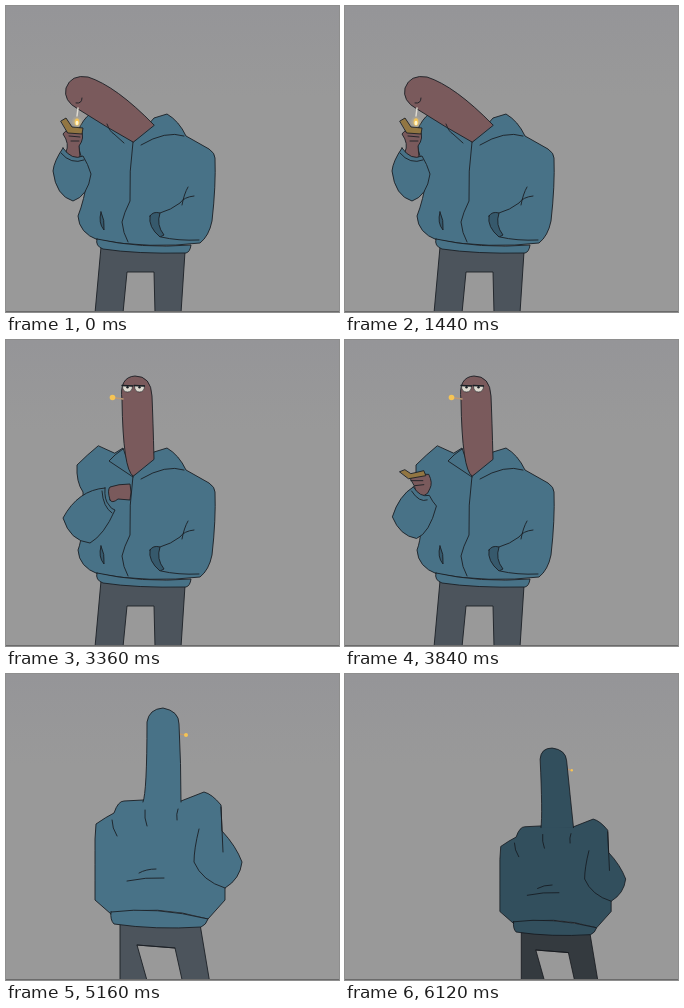
An HTML page with a canvas for the animation above (6.24 s loop, 333 by 306 pixels).

```html
<!DOCTYPE html>
<html>
<head>
<meta charset="utf-8">
<style>
html, body { margin: 0; height: 100%; overflow: hidden; background: #999; }
canvas { display: block; }
</style>
</head>
<body>
<canvas id="stage" width="333" height="306"></canvas>
<script>
const ctx = document.getElementById('stage').getContext('2d');
const LOOP = 6240, STEP = 120;
const INK = [27, 32, 37], BLUE = [72, 114, 135], SKIN = [122, 90, 92], PANTS = [76, 84, 92],
  DARK = [54, 89, 108], GOLD = [146, 118, 66], TAN = [188, 152, 116], WHITE = [222, 218, 208],
  GLOW = [246, 196, 84], GREY = [153, 153, 153];
let light = 1;

const ramp = (t, a, b) => {
  const p = Math.min(1, Math.max(0, (t - a) / (b - a)));
  return p * p * (3 - 2 * p);
};
const lerp = (a, b, k) => a + (b - a) * k;
const css = c => `rgb(${c.map(v => Math.round(v * light))})`;

// Blend two path strings that share the same commands.
function mix(a, b, k) {
  const target = b.match(/-?[\d.]+/g);
  let i = 0;
  return a.replace(/-?[\d.]+/g, n => lerp(+n, +target[i++], k).toFixed(2));
}
function shape(d, fill, width = .9) {
  const path = new Path2D(d);
  if (fill) { ctx.fillStyle = css(fill); ctx.fill(path); }
  if (width) { ctx.strokeStyle = css(INK); ctx.lineWidth = width; ctx.stroke(path); }
}
function dot(x, y, rx, ry, fill) {
  ctx.fillStyle = css(fill);
  ctx.beginPath();
  ctx.ellipse(x, y, rx, ry, 0, 0, 7);
  ctx.fill();
}
function cigarette(x1, y1, x2, y2, paper, glow) {
  ctx.strokeStyle = css(paper);
  ctx.lineWidth = 1.5;
  ctx.beginPath();
  ctx.moveTo(x1, y1);
  ctx.lineTo(x2, y2);
  ctx.stroke();
  if (glow) dot(x2, y2, glow, glow, GLOW);
}
function flame(x, y, t) {
  const h = 3.6 + Math.sin(t * 7.3);
  const halo = ctx.createRadialGradient(x, y, 0, x, y, 6);
  halo.addColorStop(0, '#ffd97a88');
  halo.addColorStop(1, '#ffd97a00');
  ctx.fillStyle = halo;
  ctx.fillRect(x - 6, y - 6, 12, 12);
  dot(x, y, 2.3, h, GLOW);
  dot(x, y + 1, 1.5, h * .6, [255, 245, 205]);
}

const HEAD = {
  down: 'M127 136 Q100 121 72 103 Q57 95 60 82 Q65 68 82 71 Q110 80 148 119 Z',
  up: 'M127 136 Q117 130 116 60 Q113 37 129 36 Q145 36 146 56 Q147 80 148 119 Z'
};
const SLEEVE = {
  face: 'M57 142 Q48 155 47 165 Q50 190 67 195 Q82 190 85 168 Q82 158 77 150 Q66 155 57 142 Z',
  away: 'M45 146 Q40 160 40 176 Q48 192 62 195 Q74 192 78 163 Q74 156 70 148 Q57 156 45 146 Z',
  inside: 'M99 148 Q72 150 57 178 Q64 201 84 203 Q98 195 109 170 Q105 169 103 165 Q98 160 99 148 Z'
};
const HAND = {
  face: 'M60 146 Q64 138 57 128 Q60 122 75 124 Q79 132 73 140 L74 152 Q66 154 60 146 Z',
  away: 'M47 150 Q47 142 36 133 Q36 125 53 127 Q59 136 55 140 L60 149 Q53 154 47 150 Z',
  inside: 'M104 160 Q101 150 104 147 Q112 144 124 144 Q126 152 124 160 L112 159 Q106 164 104 160 Z'
};
const LIGHTER = [
  'M55 115 L60 112 L66 121 L77 122 L76 128 L62 127 Z',
  'M31 123 L36 121 L42 125 L55 122 L57 127 L40 130 Z'
];

function drawFront(t) {
  const up = ramp(t, 2460, 2820), away = ramp(t, 2040, 2400);
  const inside = ramp(t, 2640, 3120) - .6 * ramp(t, 3480, 3900);
  const arm = pose => mix(mix(pose.face, pose.away, away), pose.inside, inside);

  shape('M95 241 L89 307 L117 307 L121 266 L148 266 L149 307 L175 307 L179 246 Z', PANTS);
  const right = 'Q78 195 72 210 Q73 227 92 234 Q145 243 194 237 Q203 230 206 215 Q210 180 209 152 Q209 147 203 143 L180 130 Q173 115 161 108 L148 112 L127 136 ';
  shape(mix(
    'M84 108 Q77 113 72 125 Q70 142 82 170 ' + right + 'L102 114 L95 111 Z',
    'M92 106 Q81 115 71 125 Q70 142 77 152 ' + right + 'L117 108 L109 113 Z', up), BLUE);
  shape('M91 233 Q135 243 185 239 Q184 246 180 247 Q130 248 97 243 Q89 240 91 233 Z', BLUE);
  shape('M127 136 Q123 165 124 195 Q118 207 116 216 Q117 227 122 236 M178 130 Q160 124 135 139');
  shape('M188 190 Q178 191 174 197 Q165 204 154 207 M182 181 Q178 188 176 199 M155 231 Q172 235 193 234');
  shape('M144 210 Q142 221 154 231 L158 229 Q150 219 154 207 Q147 205 144 210 Z', DARK);
  shape('M95 206 Q92 217 98 224 Q99 214 95 206 Z', DARK);

  shape(mix(HEAD.down, HEAD.up, up), SKIN);
  shape(mix('M101 118 Q104 126 108 128 L118 137', 'M117 109 Q108 115 103 121 L127 137', up));
  if (up < .5) shape('M70 97 Q76 98 76 92');
  else {
    ctx.save();
    ctx.translate(lerp(-12, 0, up), lerp(12, 0, up));
    for (const x of [121.5, 133.5]) {
      shape(`M${x - 5} 46 Q${x - 5} 52 ${x} 52 Q${x + 5} 52 ${x + 5} 46 Z`, WHITE, .6);
      dot(x, 47.3, 1.2, 1.2, INK);
      shape(`M${x - 5.5} 45.5 L${x + 5} 46`, null, 1.3);
    }
    ctx.restore();
  }
  const lit = t > 1500;
  cigarette(lerp(72, 117, up), lerp(102, 59, up), lerp(71, 106.5, up), lerp(110, 57.5, up),
    lit ? TAN : WHITE, lit && lerp(.8, 2.8, up));

  shape(arm(HAND), SKIN);
  shape(arm(SLEEVE), BLUE);
  // Inner cuff seam
  shape(mix(mix('M55 147 Q65 159 78 154', 'M44 151 Q57 160 64 150', away), 'M96 151 Q97 167 106 173', inside));
  if (inside < .6) {
    ctx.save();
    ctx.translate(55 * inside, 20 * inside);
    shape(mix(LIGHTER[0], LIGHTER[1], away), GOLD);
    shape(mix('M63 130 L74 131 M65 135 L73 135', 'M42 132 L54 132 M46 137 L55 136', away));
    ctx.restore();
  }
  if (t < 2580) flame(lerp(71, 44, away), lerp(116, 116.5, away), t);
}

const TUBE = {
  lean: 'M152 129 Q180 105 214 101 Q229 98 231 109 Q230 120 222 123 Q198 114 157 139',
  up: 'M137 128 Q141 118 141 48 Q143 35 157 34 Q173 37 173 50 Q175 90 175 128',
  walk: 'M137 128 Q139 112 136 48 Q137 35 150 35 Q166 37 167 50 Q171 90 175 128'
};

function drawBack(t) {
  const fist = ramp(t, 4620, 4980), hood = ramp(t, 4320, 4680);
  const lean = ramp(t, 3900, 4260) - fist;
  const p = Math.min(1, Math.max(0, (t - 5160) / 960));
  const scale = 1 - .144 * p;
  const swing = p ? 6 * Math.sin((t - 5160) / 240 * Math.PI) : 0;
  const pose = (a, b) => mix(a, b, fist);

  ctx.save();
  ctx.translate(78.7 * (1 - (1 - p) ** 1.5), 306 * (1 - scale));
  ctx.scale(scale, scale);

  if (t >= 4920) cigarette(173 - 4 * p, 60, 180 - 7 * p, 61, TAN, 2 - .6 * p);
  light = 1 - .31 * p;
  shape(pose(
    'M116 246 L116 310 L143 310 L143 270 L168 270 L169 310 L196 310 L197 248 Z M133 270 L174 271',
    `M114 250 L${114 + swing} 310 L${142 + swing} 310 L131 271 L169 274 L${177 - swing} 310 L${204 - swing} 310 L194 250 Z M131 271 L169 274`), PANTS);
  shape(pose(
    'M110 240 L99 224 Q102 185 104 155 L98 110 Q96 92 106 89 Q120 86 132 96 L136 117 Q142 130 153 122 L205 118 Q222 118 233 129 L235 155 Q248 180 249 193 Q245 211 224 216 L221 226 L203 242 Q150 228 110 240 Z',
    'M105 240 L89 226 Q89 185 89 165 L90 150 Q100 143 108 139 Q112 127 118 127 L137 126 Q155 127 175 127 L198 118 Q206 120 215 131 L216 157 Q230 172 236 188 Q234 205 219 214 L219 226 L202 245 Q150 230 105 240 Z'), BLUE);
  shape(pose(
    'M110 238 Q150 226 203 242 Q203 248 197 250 Q150 254 115 249 Q109 245 110 238 Z',
    'M105 238 Q150 232 202 245 Q200 251 195 253 Q150 256 108 250 Q104 246 105 238 Z'), BLUE);
  shape(pose('M206 158 Q200 180 199 190 Q208 210 226 216', 'M193 155 Q188 175 188 188 Q196 207 219 214'));
  shape(pose(
    'M138 198 Q155 194 168 195 M132 205 Q150 201 169 202',
    'M133 199 Q140 195 150 195 M121 207 Q140 203 158 204'));

  const tube = mix(mix(TUBE.up, TUBE.lean, lean), TUBE.walk, p);
  shape(tube, hood < 1 ? SKIN : BLUE);
  if (hood > 0 && hood < 1) {
    ctx.save();
    ctx.beginPath();
    ctx.rect(0, 0, 150 + 85 * hood, 306);
    ctx.clip();
    shape(tube, BLUE);
    ctx.restore();
  }

  if (fist < .5) {
    const pull = 48 * hood;
    shape('M134 126 Q146 172 157 173 Q172 172 197 126 L204 119');
    shape('M104 120 Q112 126 130 121 M115 141 L119 136');
    shape('M126 123 L134 117 L136 125 Z', GREY, 0);
    ctx.save();
    ctx.translate(pull, -pull * .15);
    if (pull) shape(`M${122 - pull} 91 L133 95 L137 113 L${125 - pull} 121`, BLUE);
    shape('M134 102 Q148 100 162 111 Q164 121 159 125 Q151 120 148 125 Q140 128 135 120 Z', SKIN);
    shape('M145 108 Q153 111 159 118 M141 113 Q149 114 154 121 M138 118 Q144 118 148 125');
    shape('M136 96 Q127 93 125 104 Q125 114 133 118 L137 115 Q132 107 138 99 Z', BLUE);
    ctx.restore();
  } else {
    shape('M106 146 Q106 154 111 162 M139 136 Q138 144 141 152 M172 135 Q170 140 171 146 M215 133 L217 178');
  }
  ctx.restore();
  light = 1;
}

const backdrop = ctx.createLinearGradient(0, 0, 0, 90);
backdrop.addColorStop(0, '#959598');
backdrop.addColorStop(1, '#999999');
ctx.lineJoin = ctx.lineCap = 'round';

function draw(now) {
  const t = Math.floor(now % LOOP / STEP) * STEP;
  ctx.fillStyle = backdrop;
  ctx.fillRect(0, 0, 333, 306);
  (t < 3960 ? drawFront : drawBack)(t);
  ctx.fillStyle = '#6b6b6b';
  ctx.fillRect(0, 305, 333, 1);
  requestAnimationFrame(draw);
}
draw(0);
</script>
</body>
</html>
```
